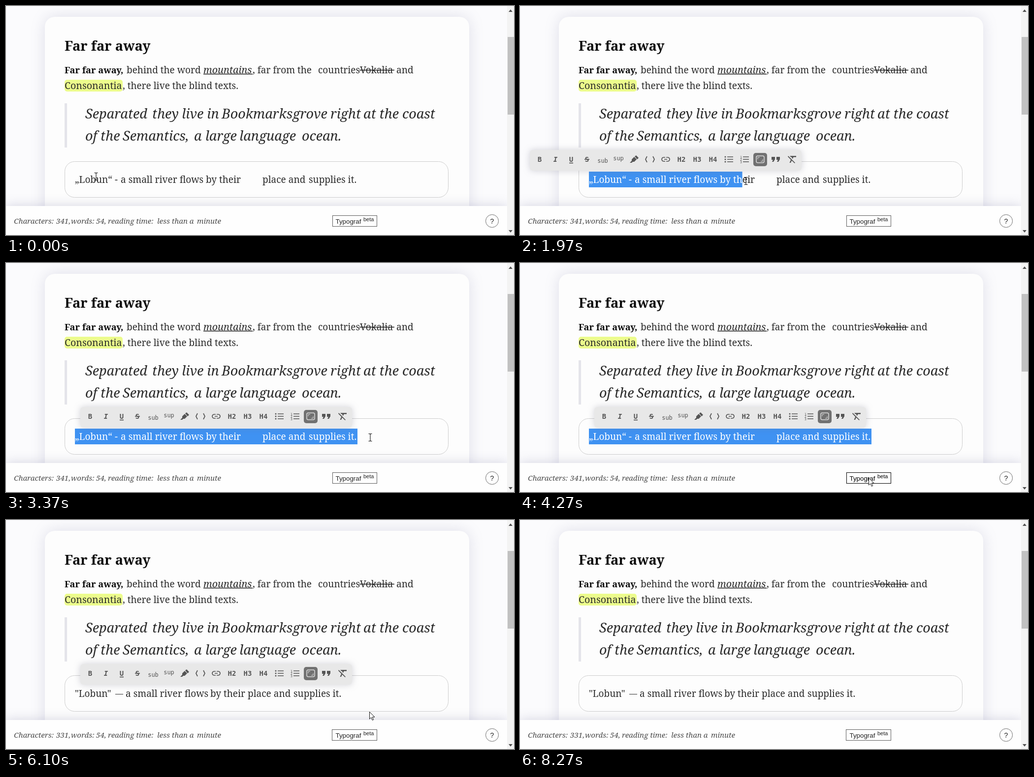
Write an HTML page that moves like this. It is 1032 px wide and 466 px high and loops after 8.31 s.

```html
<!DOCTYPE html>
<html lang="en">
<head>
<meta charset="utf-8">
<title>Text editor</title>
<style>
  html, body { margin: 0; width: 100%; height: 100%; overflow: hidden; }
  #stage { position: relative; width: 1032px; height: 466px; overflow: hidden; background: #fbfbfd; }
  #card { position: absolute; left: 79px; top: 22px; width: 862px; height: 500px; border-radius: 20px;
    background: #fdfdfd; box-shadow: 0 0 30px rgba(110, 110, 150, .2); }
  #foot { position: absolute; left: 0; top: 407px; width: 1018px; height: 70px;
    background: #fefefe; box-shadow: 0 0 22px rgba(110, 110, 150, .28); }
  svg { position: absolute; left: 0; top: 0; }
  text { font-family: "Noto Serif", serif; white-space: pre; }
  .ui text, text.ui { font-family: "Liberation Sans", Arial, sans-serif; }
  #bar text { font-family: "DejaVu Sans Mono", monospace; text-anchor: middle; }
  #panel { filter: drop-shadow(0 0 7px rgba(110, 110, 130, .3)); }
</style>
</head>
<body>
<div id="stage">
  <div id="card"></div>
  <div id="foot"></div>
  <svg id="art" width="1032" height="466"></svg>
</div>
<script>
const LOOP = 8310;
const art = document.getElementById('art');

// One line of text made of pieces: x, string, x, string, ...
function line(y, size, pieces, attrs = '') {
  let out = '';
  for (let i = 0; i < pieces.length; i += 2)
    out += `<text x="${pieces[i]}" y="${y}" font-size="${size}" ${attrs}>${pieces[i + 1]}</text>`;
  return out;
}
const rect = (x, y, w, h, attrs) => `<rect x="${x}" y="${y}" width="${w}" height="${h}" ${attrs}/>`;
const path = (d, attrs = '') => `<path d="${d}" ${attrs}/>`;

const italic = 'font-style="italic"', bold = 'font-weight="700"';

const page =
  rect(119, 150, 118, 24, 'rx="5" fill="#ecfc8c"') +
  rect(119, 198, 5, 90, 'fill="#e4e4ea"') +
  line(91, 27.4, [119, 'Far far away'], bold + ' fill="#0a0a0a"') +
  '<g fill="#2a2a2a">' +
  line(137, 18.2, [119, 'Far far away,'], bold + ' fill="#0a0a0a"') +
  line(137, 19, [245, 'behind the word', 501, ', far from the', 634, 'countries', 719, 'Vokalia', 793, 'and']) +
  line(137, 19.8, [401, 'mountains'], italic) +
  line(169, 19, [237, ', there live the blind texts.']) +
  line(169, 19.6, [119, 'Consonantia']) +
  line(229, 27, [161, 'Separated', 297, 'they', 357, 'live in', 438, 'Bookmarksgrove', 659, 'right',
    726, 'at the coast'], italic) +
  line(274, 27, [161, 'of the', 237, 'Semantics,', 382, 'a large', 474, 'language', 601, 'ocean.'], italic) +
  '</g>' +
  path('M401 138.5H501M718 130.5H789', 'stroke="#1a1a1a" stroke-width="1.3"') +
  rect(119.5, 316.5, 779, 73, 'rx="20" fill="none" stroke="#cdcdcd"');

const rawText = line(360, 19, [140, '„Lobun“', 221, '-', 233, 'a small river flows', 406, 'by their',
  521, 'place and', 615, 'supplies it.']);
const cleanText = line(360, 19, [140, '"Lobun"', 243, 'a small river flows', 415, 'by their',
  491, 'place and', 584, 'supplies it.']) + line(359, 16, [222, '—']);

const footer =
  '<g fill="#4a4a4a">' +
  line(443, 15, [16, 'Characters:', 132, 'words:', 183, '54,', 207, 'reading time:',
    307, 'less than a', 388, 'minute'], italic) +
  '<text id="count" x="102" y="443" font-size="15" font-style="italic"></text></g>' +
  '<g id="button" class="ui">' +
  '<rect id="frame" y="426.5" height="22" fill="#fefefe"/>' +
  line(443, 13.33, [669.5, 'Typograf']) + line(438, 11, [726, 'beta']) + '</g>' +
  '<circle cx="987.5" cy="437.5" r="13" fill="#fefefe" stroke="#6a6a6a"/>' +
  line(442.5, 14, [983.6, '?'], 'class="ui" fill="#222"');

const scroll =
  rect(1018, 0, 14, 466, 'fill="#f3f3f3"') +
  rect(1019, 63, 13, 158, 'fill="#c1c1c1"') +
  path('M1021 12h8l-4-5zM1021 456h8l-4 5z', 'fill="#505050"');

// Toolbar items sit 32px apart, each drawn around its own centre.
const label = (s, size = 14, y = 5, extra = bold) => `<text y="${y}" font-size="${size}" ${extra}>${s}</text>`;
const stroke = 'fill="none" stroke="#555" stroke-width="1.7"';
const rows = [-5, 0, 5];
const items = [
  label('B'), label('I', 14, 5, bold + ' ' + italic), label('U') + path('M-4 7.5H4', stroke),
  label('S') + path('M-5 0H5', stroke),
  label('sub', 12, 7, ''), label('sup', 12, 2, ''),
  path('M1-6L4-8 9-3 6 0zM0-5L5 0 0 5H-3L-5 7H-9L-5 3V0z'),
  path('M-6-6l-3 6 3 6M6-6l3 6-3 6', stroke),
  path('M-1-4H-4a4 4 0 0 0 0 8H-1M1-4H4a4 4 0 0 1 0 8H1M-3 0H3', stroke),
  label('H2'), label('H3'), label('H4'),
  rows.map(y => `<circle cx="-7" cy="${y}" r="1.5"/>`).join('') + path('M-3-5H9M-3 0H9M-3 5H9', stroke),
  rows.map((y, i) => `<text x="-7" y="${y + 2.5}" font-size="6.5">${i + 1}</text>`).join('') +
    path('M-3-5H9M-3 0H9M-3 5H9', stroke),
  rect(-14, -13, 28, 27, 'rx="5" fill="#717171"') +
    rect(-8, -7, 16, 14, 'rx="3" fill="none" stroke="#dcdcdc" stroke-width="1.5"') +
    path('M-5 0V-4H-1M5 0V4H1', 'fill="none" stroke="#dcdcdc"'),
  path('M-9-5h7v5l-3 5h-3l2-4h-3zM1-5h7v5l-3 5h-3l2-4h-3z'),
  path('M-4-7H9v2.5H3.5L2-1 0-3 .6-4.5H-1.5zM-7-7L7 7 5.7 8 0 2.5-2 7H-4.5L-1.8 1-8-5.500z')
];
const toolbar =
  '<g id="bar" fill="#555">' + rect(0, 293, 552, 42, 'id="panel" rx="6" fill="#e8e8e8"') +
  items.map((s, i) => `<g transform="translate(${20 + 32 * i} 312)">${s}</g>`).join('') + '</g>';

art.innerHTML =
  '<clipPath id="clip"><rect id="clipBox" x="140" y="337" height="32"/></clipPath>' +
  page +
  `<g id="raw"><g fill="#2c2c2c">${rawText}</g>` +
  '<rect id="mark" x="140" y="337" height="32" fill="#3f92f2"/>' +
  `<g clip-path="url(#clip)" fill="#fff">${rawText}</g></g>` +
  `<g id="clean" fill="#2c2c2c">${cleanText}</g>` +
  rect(0, 342, 1, 23, 'id="caret" fill="#111"') +
  toolbar + footer + scroll +
  '<g id="beam">' +
  path('M-3.5-7.5h2.5l1 1 1-1h2.5M0-6.5v13M-3.5 7.5h2.5l1-1 1 1h2.5', 'fill="none" stroke="#111" stroke-width="1.1"') +
  '</g><g id="arrow">' +
  path('M.5.5V15l3.4-3.2 2.4 5.6 2.3-1-2.4-5.4H11z', 'fill="#fff" stroke="#111"') + '</g>';

const el = {};
for (const node of art.querySelectorAll('[id]')) el[node.id] = node;
const show = (node, on) => node.setAttribute('display', on ? 'inline' : 'none');
const move = (node, x, y) => node.setAttribute('transform', `translate(${x} ${y})`);

// Pointer stops: time, x, y
const stops = [
  [0, 183, 347], [30, 183, 347], [370, 148, 352], [550, 148, 352], [600, 134, 360],
  [1170, 134, 360], [1200, 141, 358], [1450, 141, 358], [2450, 740, 354],
  [3350, 740, 354], [3670, 708, 437], [5750, 708, 437], [6300, 751, 370],
  [6980, 751, 370], [7300, 908, 480], [LOOP, 908, 480]
];
function pointer(t) {
  let i = 1;
  while (t > stops[i][0]) i++;
  const [t0, x0, y0] = stops[i - 1], [t1, x1, y1] = stops[i];
  const p = (t - t0) / (t1 - t0), s = p * p * (3 - 2 * p);
  return [x0 + (x1 - x0) * s, y0 + (y1 - y0) * s];
}

const CHAR = 10.05, LEFT = 140, RIGHT = 714;
// The selection trails the pointer a little and snaps to characters.
function selectionEnd(t, x) {
  if (t < 1470 || t >= 4630) return LEFT;
  const end = LEFT + Math.round((x - 8 - LEFT) / CHAR) * CHAR;
  return Math.max(LEFT, Math.min(RIGHT, end));
}

function draw(t) {
  const [px, py] = pointer(t);
  const x = Math.round(px), y = Math.round(py);
  const end = t > 2450 && t < 4630 ? RIGHT : selectionEnd(t, x);
  const selected = end > LEFT, replaced = t >= 4630, counted = t >= 5630;

  show(el.raw, !replaced);
  show(el.clean, replaced);
  el.mark.setAttribute('width', end - LEFT);
  el.clipBox.setAttribute('width', end - LEFT);

  const atStart = t >= 1200 && t < 4630 && !selected;
  const atEnd = (t >= 6240 && t < 6770) || (t >= 7300 && t < 7870);
  show(el.caret, atStart || atEnd);
  el.caret.setAttribute('x', atStart ? 140 : 684);

  show(el.bar, selected || (replaced && t < 6240));
  const middle = (LEFT + (replaced ? RIGHT : end)) / 2;
  move(el.bar, Math.max(0, Math.round(middle - 276)), 0);

  el.count.textContent = counted ? '331,' : '341,';
  const hover = x > 662 && x < 754 && y > 426 && y < 449;
  const left = counted ? 662.5 : 663.5;
  el.frame.setAttribute('x', left);
  el.frame.setAttribute('width', 753.5 - left);
  el.frame.setAttribute('stroke', hover ? '#000' : '#5c5c5c');
  el.button.setAttribute('fill', hover ? '#000' : '#222');

  const typing = y < 390;
  show(el.beam, typing);
  show(el.arrow, !typing);
  move(typing ? el.beam : el.arrow, x, y);
}

function tick() {
  draw(performance.now() % LOOP);
  requestAnimationFrame(tick);
}
tick();
</script>
</body>
</html>
```
